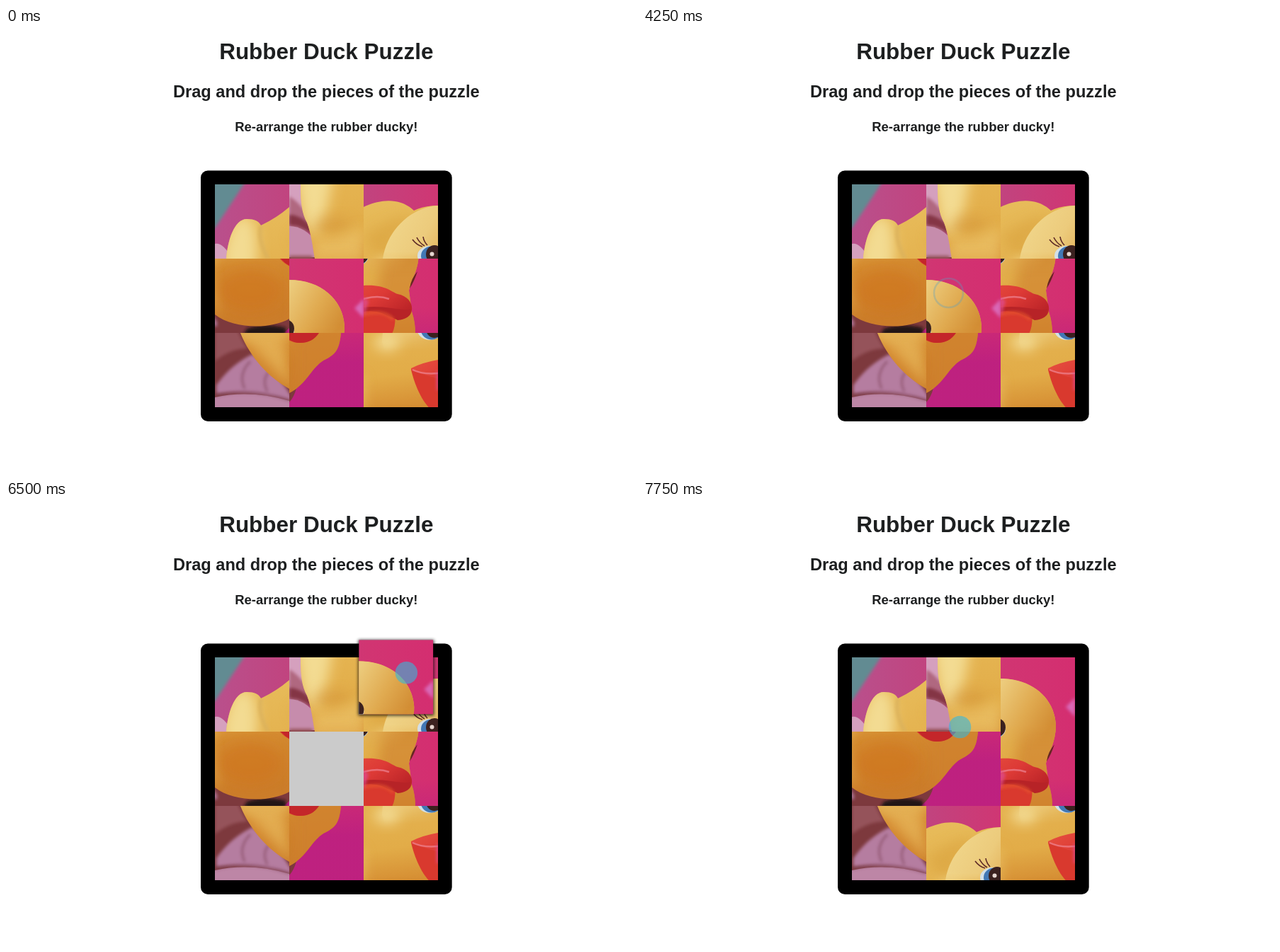
Write an HTML page that moves like this. It is 891 px wide and 629 px high and loops after 8 s.

```html
<!DOCTYPE html>
<html lang="en">
<head>
<meta charset="utf-8">
<title>Rubber Duck Puzzle</title>
<style>
  html, body { margin: 0; width: 100%; height: 100%; overflow: hidden; background: #fff; }
  svg { display: block; }
  text { font-family: "Liberation Sans", Arial, sans-serif; font-weight: bold; fill: #1d1f20; text-anchor: middle; }
</style>
</head>
<body>
<svg id="stage" width="891" height="629" viewBox="0 0 891 629">
  <defs>
    <linearGradient id="pink" x2="1" y2="0">
      <stop offset="0" stop-color="#b9508c"/>
      <stop offset=".33" stop-color="#c1447f"/>
      <stop offset=".7" stop-color="#d13572"/>
      <stop offset="1" stop-color="#d42e70"/>
    </linearGradient>
    <linearGradient id="magenta" x2="0" y2="1">
      <stop offset=".55" stop-color="#bd2080" stop-opacity="0"/>
      <stop offset=".8" stop-color="#bd2080" stop-opacity=".95"/>
    </linearGradient>
    <linearGradient id="body" x2=".12" y2="1">
      <stop offset="0" stop-color="#e8bd5c"/>
      <stop offset=".55" stop-color="#e2ac48"/>
      <stop offset=".74" stop-color="#d48a30"/>
      <stop offset="1" stop-color="#cc7d2a"/>
    </linearGradient>
    <linearGradient id="head" x2="1" y2=".45">
      <stop offset="0" stop-color="#f2da90"/>
      <stop offset=".45" stop-color="#eccb7c"/>
      <stop offset=".75" stop-color="#e0aa50"/>
      <stop offset="1" stop-color="#d28d34"/>
    </linearGradient>
    <linearGradient id="fade" x2="0" y2="1">
      <stop offset=".5" stop-color="#fff"/>
      <stop offset=".74" stop-color="#000"/>
    </linearGradient>
    <linearGradient id="lip" x2="1" y2=".6">
      <stop offset="0" stop-color="#e6503f"/>
      <stop offset=".55" stop-color="#dd3a36"/>
      <stop offset="1" stop-color="#bd2528"/>
    </linearGradient>
    <filter id="soft" x="-50%" y="-50%" width="200%" height="200%"><feGaussianBlur stdDeviation="2"/></filter>
    <filter id="haze" x="-60%" y="-60%" width="220%" height="220%"><feGaussianBlur stdDeviation="9"/></filter>
    <mask id="headMask"><rect x="100" y="20" width="200" height="150" fill="url(#fade)"/></mask>
    <path id="outline" d="M16 105C18 80 27 49 45 49C56 49 62 52 65 58Q88 47 105 32C128 21 156 18 176 37
      Q191 30 210 30C255 30 286 58 288 95C288 122 277 135 274 150L278 180Q283 195 283 210
      C281 232 276 240 262 247C242 256 236 282 210 295C184 310 132 310 105 289C76 273 50 245 36 210
      C33 192 31 175 25 159C17 145 16 128 16 105Z"/>
    <clipPath id="inside"><use href="#outline"/></clipPath>

    <g id="duck">
      <rect width="315" height="315" fill="url(#pink)"/>
      <rect width="315" height="315" fill="url(#magenta)"/>
      <path d="M-8-8H46L0 62H-8Z" fill="#628b92" filter="url(#soft)"/>
      <path d="M315 57L302 70L315 84Z" fill="#d967b6" filter="url(#soft)"/>
      <!-- hand -->
      <path d="M0 84Q12 82 24 105V170H0Z" fill="#d5a0be"/>
      <path d="M0 122Q15 130 30 155V172H0Z" fill="#b06780" filter="url(#soft)"/>
      <path d="M0 148Q16 148 32 165V176Q16 162 0 163Z" fill="#843645" filter="url(#soft)"/>
      <path d="M0 164Q22 164 40 188V212H0Z" fill="#c68cac"/>
      <path d="M0 208H40L112 292L220 288Q214 312 194 318H0Z" fill="#7d393d"/>
      <path d="M0 206H32Q40 225 46 232Q22 232 0 250Z" fill="#95525a" filter="url(#soft)"/>
      <path d="M2 284Q22 255 53 240Q90 268 108 300V306Q50 290 2 296Z" fill="#b57da0" filter="url(#soft)"/>
      <path d="M0 301Q50 290 105 306V315H0Z" fill="#bd86a6"/>
      <path d="M42 289Q32 268 50 250M74 293Q66 277 76 265M0 299Q50 286 105 305" fill="none" stroke="#83485f" stroke-width="2.500" opacity=".75" filter="url(#soft)"/>
      <path d="M150 309Q175 300 205 308V318H145Z" fill="#211614" filter="url(#soft)"/>
      <!-- body -->
      <use href="#outline" fill="url(#body)"/>
      <g clip-path="url(#inside)">
        <path d="M10 100Q25 35 45 45Q60 50 60 100Q55 145 38 180L20 160Z" fill="#f3db92" filter="url(#haze)"/>
        <path d="M65 58Q60 78 75 105" fill="none" stroke="#dcb25c" stroke-width="5" filter="url(#soft)"/>
        <ellipse cx="60" cy="163" rx="28" ry="12" fill="#d3953a" opacity=".5" filter="url(#haze)"/>
        <path d="M36 179Q60 188 105 164V215H30Z" fill="#ebc268" opacity=".8" filter="url(#haze)"/>
        <path d="M30 205H95L110 290Z" fill="#e5b256" opacity=".85" filter="url(#haze)"/>
        <path d="M105 75Q135 50 176 42L130 105Z" fill="#d9a23e" opacity=".6" filter="url(#haze)"/>
        <path d="M240 90H300V300H215V225Z" fill="#cf812f" opacity=".65" filter="url(#haze)"/>
        <ellipse cx="155" cy="255" rx="46" ry="30" fill="#cf751d" opacity=".6" filter="url(#haze)"/>
        <path d="M131 118C131 70 170 32 210 30C255 30 286 58 288 95V150H140Z" fill="url(#head)" mask="url(#headMask)"/>
        <ellipse cx="138" cy="118" rx="18" ry="12" fill="#f3dc94" filter="url(#haze)"/>
      </g>
      <path d="M275 147Q277 133 286 123Q281 138 275 147Z" fill="#652621"/>
      <!-- eye -->
      <ellipse cx="199" cy="101" rx="18" ry="14" fill="#d3e0e8"/>
      <ellipse cx="201" cy="101" rx="15" ry="13.500" fill="#4278b5"/>
      <ellipse cx="205" cy="99" rx="12" ry="13" fill="#3b211f"/>
      <circle cx="201.500" cy="98.500" r="3" fill="#e6d6d0"/>
      <path d="M174 78Q180 86 188 88M180 75Q184 83 191 87M189 74Q190 81 195 86" fill="none" stroke="#5d2926" stroke-width="1.600"/>
      <!-- beak -->
      <path d="M172 157C178 182 194 224 225 224C247 224 257 209 254 180L230 158Z" fill="#d9392e"/>
      <path d="M172 155Q187 147 210 143C240 141 249 152 258 155C278 159 282 176 275 185C265 196 238 187 225 174Q200 168 172 157Z" fill="url(#lip)"/>
      <path d="M210 174C238 170 265 180 276 176Q278 190 258 192Q232 176 210 180Z" fill="#b72327"/>
      <path d="M210 184Q238 176 252 191" fill="none" stroke="#e9592e" stroke-width="3" filter="url(#soft)"/>
      <path d="M174 157Q188 164 210 162Q230 156 246 162" fill="none" stroke="#f08a9c" stroke-width="2.500" opacity=".65"/>
      <path d="M208 158L217 165L211 184L208 188Z" fill="#dd4b91" opacity=".8" filter="url(#soft)"/>
      <path d="M198 210Q211 224 225 224Q243 224 252 210Z" fill="#c4262a"/>
    </g>
  </defs>

  <rect width="891" height="629" fill="#fff"/>
  <text x="452.300" y="43.500" font-size="31.450">Rubber Duck Puzzle</text>
  <text x="452.300" y="98.300" font-size="23.600">Drag and drop the pieces of the puzzle</text>
  <text x="452.300" y="145.500" font-size="18.450">Re-arrange the rubber ducky!</text>
  <rect x="275" y="201.500" width="354.700" height="354.500" rx="10"/>
  <rect x="295" y="221" width="315" height="315" fill="#cbcbcb"/>
  <g id="board"></g>
  <circle id="touch"/>
</svg>
<script>
const NS = 'http://www.w3.org/2000/svg';
const LOOP = 8000, STEP = 250, SIZE = 105, LEFT = 295, TOP = 221;
const FIRST_TOUCH = 1000, GRAB = 6000, DROP = 6750, SETTLED = 7250;
const board = document.getElementById('board');
const touch = document.getElementById('touch');

function set(el, attrs) {
  for (const key in attrs) el.setAttribute(key, attrs[key]);
}
function make(tag, attrs, parent) {
  const el = document.createElementNS(NS, tag);
  set(el, attrs);
  return parent.appendChild(el);
}
const cell = i => [LEFT + i % 3 * SIZE, TOP + Math.floor(i / 3) * SIZE];
const mix = (a, b, k) => a.map((v, i) => v + (b[i] - v) * k);
const progress = (t, from, to) => Math.min(1, Math.max(0, (t - from) / (to - from)));
const easeOut = u => 1 - (1 - u) ** 2;
const easeInOut = (u, power) => u ** power / (u ** power + (1 - u) ** power);

// Picture part shown in each cell at the start; tiles are added back to front
const parts = [0, 3, 1, 7, 2, 5, 6, 8, 4];
const tiles = [];
function addTile(i) {
  const [x, y] = cell(i), [px, py] = cell(parts[i]);
  tiles[i] = make('svg', {
    x, y, width: SIZE, height: SIZE,
    viewBox: `${px - LEFT} ${py - TOP} ${SIZE} ${SIZE}`
  }, board);
  make('use', { href: '#duck' }, tiles[i]);
}
[0, 1, 3, 7, 2, 5, 6, 8].forEach(addTile);
const shadow = make('rect', { width: SIZE + 2, height: SIZE + 2, opacity: .75, filter: 'url(#soft)' }, board);
addTile(4);

// Finger movements; the finger rests at the end of each one
const glides = [
  { start: 1250, end: 2000, from: [477.5, 267.5], to: [347.5, 339], power: 1, bend: [105, 14] },
  { start: 2750, end: 3500, from: [347.5, 339], to: [431.5, 371.5], power: 4 },
  { start: 4400, end: 5000, from: [431.5, 374.5], to: [506, 265.5], power: 1.5 },
  { start: 5250, end: 5650, from: [506, 265.5], to: [468.5, 365.5], power: 2 },
  { start: GRAB, end: 6630, from: [467, 372.5], to: [572, 234], power: 2 },
  { start: 7500, end: 7750, from: [491.5, 333.5], to: [447.5, 319.5], power: 1 }
];
const taps = [
  { start: 4000, end: 4750 }, { start: GRAB, end: 6250 }, { start: 7000, end: 7500 }
];

function finger(t) {
  const { start, end, from, to, power, bend = [0, 0] } = glides.findLast(g => g.start <= t) || glides[0];
  const k = easeInOut(progress(t, start, end), power);
  return mix(from, to, k).map((v, i) => v + bend[i] * k * (1 - k));
}

function drawTouch(t) {
  const tap = taps.find(p => p.start <= t && t < p.end);
  const [cx, cy] = finger(tap ? tap.start : t);
  touch.style.display = t < FIRST_TOUCH ? 'none' : '';
  if (tap) {
    const age = (t - tap.start) / STEP;
    set(touch, {
      cx, cy: cy + (age ? 3 : 16), r: 19.5 + age, fill: 'none',
      stroke: '#5a9fc0', 'stroke-width': 2.5, opacity: .5 - .17 * age
    });
  } else {
    set(touch, { cx, cy, r: 15.75, fill: '#36b8dc', stroke: 'none', opacity: .6 });
  }
}

// The held piece follows the finger, then eases into the cell it was dropped on
function heldPosition(t) {
  const grip = mix(cell(4), finger(GRAB), -1).map((v, i) => v - cell(4)[i]);
  const held = finger(Math.min(t, DROP)).map((v, i) => v - finger(GRAB)[i] + cell(4)[i]);
  return t < GRAB ? cell(4) : mix(held, cell(2), easeOut(progress(t, DROP, SETTLED)));
}

function place(i, [x, y]) { set(tiles[i], { x, y }); }

function render(time) {
  const t = time - time % STEP;
  const slide = easeOut(progress(t, 6500, SETTLED));
  const [x, y] = heldPosition(t);
  place(4, [x, y]);
  place(7, mix(cell(7), cell(4), slide));
  place(2, mix(cell(2), cell(7), slide));
  set(shadow, { x: x - 1, y });
  shadow.style.display = t > GRAB && t < SETTLED ? '' : 'none';
  drawTouch(t);
}

const start = performance.now();
function tick() {
  render((performance.now() - start) % LOOP);
  requestAnimationFrame(tick);
}
tick();
</script>
</body>
</html>
```
